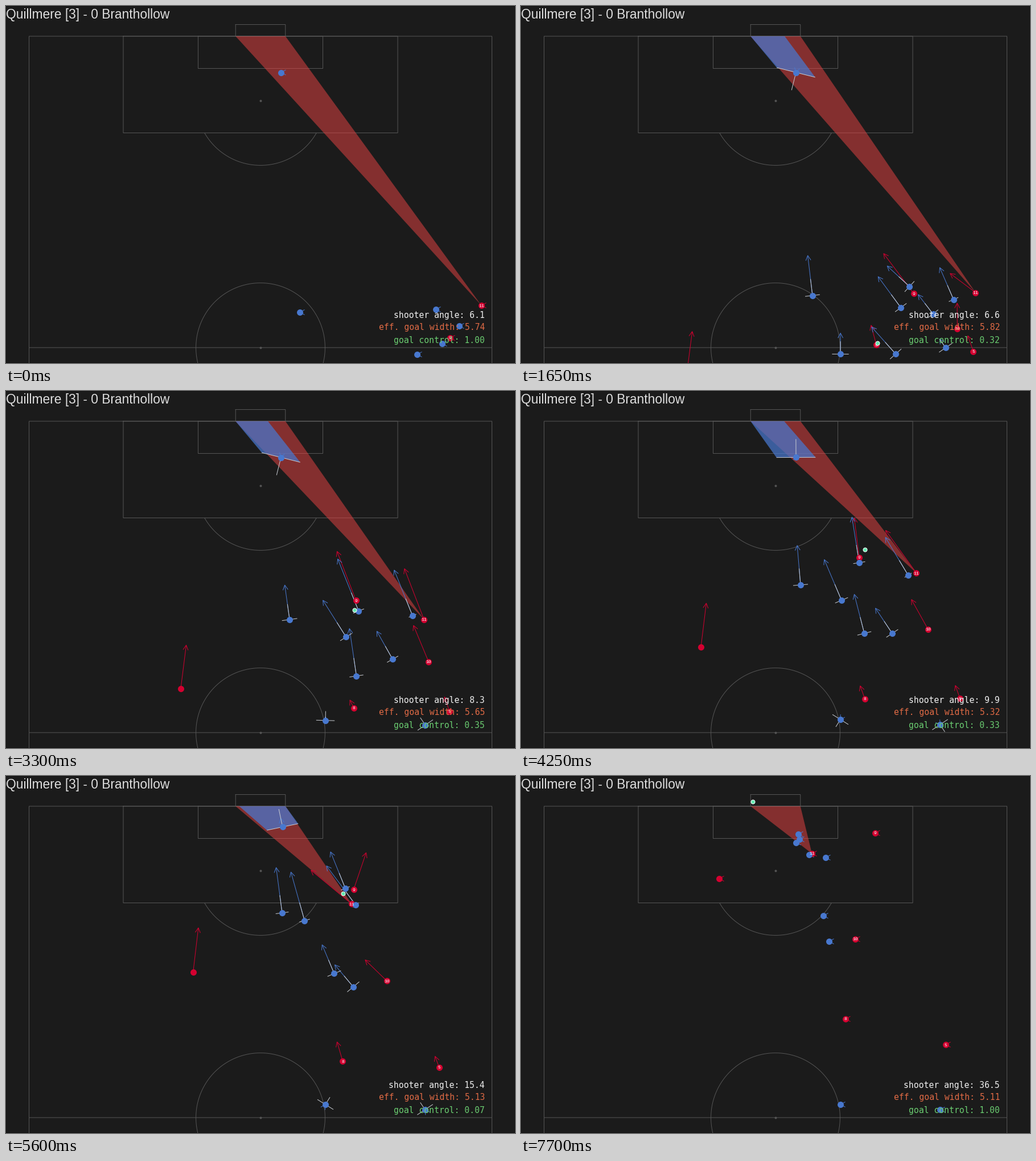
A matplotlib script that plays this animation: 894x626 px, repeating every 7750 ms.

```python
import numpy as np
import matplotlib.pyplot as plt
from matplotlib.animation import FuncAnimation
from matplotlib.collections import LineCollection

W, H, DPI = 894, 626, 64
PT = 72 / DPI                      # points per pixel
FRAMES, STEP = 155, 50

BG, LINE = "#1b1b1b", "#555555"
RED, BLUE, PALE, MINT = "#d40030", "#4878cf", "#c8ccd2", "#64ebb0"

# Pitch geometry: 68 m wide, half length 52.5 m
LEFT, RIGHT, TOP, HALF = 40.5, 853.5, 53, 599
MX, MY = (RIGHT - LEFT) / 68, (HALF - TOP) / 52.5
MID = (LEFT + RIGHT) / 2
POSTS = MID + 3.66 * MX * np.array([-1, 1])
RADIUS = 113.4

# Waypoint times, chosen by how many points a run has
CLOCKS = {3: (0, 4.25, 7.7),
          4: (0, 2.35, 4.25, 7.7),
          5: (0, 1, 4.25, 6.55, 7.7),
          7: (0, 1, 2.35, 4.25, 5.6, 6.55, 7.7)}
KICK, CONTROL, SHOT, END = 2.05, 5.6, 6.95, 7.7


def run(*points):
    """Smooth run through waypoints; gives position and velocity."""
    p, clock = np.array(points, float), np.array(CLOCKS[len(points)])
    m = np.gradient(p, clock, axis=0)

    def at(t):
        k = min(np.searchsorted(clock, t, "right") - 1, len(clock) - 2)
        h = clock[k + 1] - clock[k]
        s = (t - clock[k]) / h
        a, b, u, v = p[k], p[k + 1], m[k], m[k + 1]
        pos = (a + (3 * s**2 - 2 * s**3) * (b - a)
               + h * ((s**3 - 2 * s**2 + s) * u + (s**3 - s**2) * v))
        vel = (6 * (s - s**2) * (b - a) / h
               + (3 * s**2 - 4 * s + 1) * u + (3 * s**2 - 2 * s) * v)
        return pos, vel
    return at


def sway(t):
    """Slow rocking that turns a standing player to and fro."""
    return np.cos(np.pi * (t - .5) / 2)


def settle(rest, gap, facing):
    """Slow down from rest + gap and stay at rest."""
    rest, gap, facing = (np.array(v, float) for v in (rest, gap, facing))

    def at(t):
        k = max(0, 1 - t / 4)
        return rest + gap * k**2.5, sway(t) * facing - .625 * gap * k**1.5
    return at


def keeper(t):
    """Stand, step back towards the goal line, come out again."""
    start, span, depth = 4.2, 3.5, 30
    f = np.clip((t - start) / span, 0, 1)
    step = np.sin(np.pi * f) ** 2
    speed = -depth * np.pi / span * np.sin(2 * np.pi * f)
    return (np.array([483 + 3 * step, 116.5 - depth * step]),
            speed * np.array([.2, 1]) + 2 * sway(t) * np.array([.25, -1]))


reds = {
    "11": run((835, 525), (822.3, 519.2), (767.3, 472.2), (694.3, 319),
              (607, 224.3), (535, 175.8), (511, 136)),
    "9": run((780, 582), (724, 543), (594, 292), (625, 145), (622, 100)),
    "10": run((760, 636), (762, 532), (715, 418), (587, 286)),
    "5": run((810, 650), (771, 539), (746, 471)),
    "8": run((640, 655), (618, 573), (604, 540), (570, 426)),
    "": run((275, 770), (316, 449), (348, 180)),
}
blues = [
    keeper,
    run((516, 537), (516, 541), (506, 458), (491, 340), (485, 240), (471, 161), (487, 102)),
    run((755, 532), (709, 512), (656, 460), (594, 301), (596, 197), (553, 145), (489, 111)),
    run((796, 561), (775, 543), (680, 323), (571, 173), (535, 143)),
    run((722, 611), (691, 563), (563, 367), (508, 185), (506, 138)),
    run((766, 592), (705, 514), (652, 425), (541, 290)),
    run((735, 680), (633, 572), (603, 425), (531, 245)),
    settle((736, 585), (37, 54), (.6, .9)),
    settle((561, 576), (0, 130), (-.5, .8)),
]


def ball_at(t):
    """Carried by 8, passed ahead of 11, dribbled, then shot into the corner."""
    if t < KICK:
        return reds["8"](t)[0] + (2, -3)
    lead = np.array([-15, -18])
    if t < CONTROL:
        a, b = ball_at(KICK - 1e-6), reds["11"](CONTROL)[0] + lead
        u = (t - KICK) / (CONTROL - KICK)
        return a + (b - a) * (u, 1 - (1 - u) ** 1.7)
    if t < SHOT:
        return reds["11"](t)[0] + lead * max(0, 1 - (t - CONTROL) / .6)
    a = reds["11"](SHOT)[0]
    return a + (np.array([407, 45]) - a) * (t - SHOT) / (END - SHOT)


def heading(v):
    n = np.hypot(*v)
    return v / n if n > 1e-6 else np.array([-1.0, 0.0])


def across(u):
    return np.array([-u[1], u[0]])


def arrow(p, v):
    u, tip = heading(v), p + v
    back, wing = tip - 8.5 * u, 4.5 * across(u)
    return [[p, tip], [back + wing, tip, back - wing]]


def shoulders(p, v, dist, is_keeper):
    """Ends of the body line, left end first."""
    side = across(heading(v))
    if side[0] < 0:
        side = -side
    if is_keeper:
        half = np.interp(dist, (90, 180, 300), (22, 28, 34.8))
    else:
        half = 16.5 - .05 * np.hypot(*v) - 6 * max(0, 1 - dist / 150)
    return p - half * side, p + half * side


def to_goal_line(src, p):
    return src[0] + (p[0] - src[0]) * (TOP - src[1]) / (p[1] - src[1])


fig = plt.figure(figsize=(W / DPI, H / DPI), dpi=DPI, facecolor=BG)
ax = fig.add_axes([0, 0, 1, 1])
ax.set(xlim=(0, W), ylim=(H, 0))
ax.axis("off")


def stroke(x, y, color=LINE, lw=1.0):
    ax.plot(x, y, color=color, lw=lw * PT, zorder=1, solid_joinstyle="miter", snap=False)


def box(half_width, y0, y1):
    a, b = MID - half_width, MID + half_width
    stroke([a, a, b, b, a], [y0, y1, y1, y0, y0])


def arc(cy, a0, a1):
    a = np.linspace(a0, a1, 200)
    stroke(MID + RADIUS * np.cos(a), cy + RADIUS * np.sin(a))


stroke([0, W, W, 0, 0], [0, 0, H, H, 0], "#0c0c0c", 1.4)
stroke([LEFT, LEFT, RIGHT, RIGHT], [H + 5, TOP, TOP, H + 5])
stroke([LEFT, RIGHT], [HALF, HALF])
box(20.16 * MX, TOP, 222.5)
box(9.16 * MX, TOP, 109.5)
box(3.66 * MX, 32.5, TOP)
arc(HALF, 0, 2 * np.pi)
edge = np.arcsin(56.5 / RADIUS)
arc(166, edge, np.pi - edge)


def dots(color, diameter, z, **kw):
    return ax.scatter([], [], s=(diameter * PT) ** 2, facecolor=color, zorder=z, **kw)


def lines(color, z):
    return ax.add_collection(LineCollection([], colors=color, linewidths=PT, zorder=z))


def text(x, y, s, size, color, font, **kw):
    return ax.text(x, y, s, fontsize=size * PT, color=color, family=font, **kw)


dots(LINE, 4, 1, linewidths=0).set_offsets([(MID, 166), (MID, HALF)])
wedge, = ax.fill([0, 0, 0], [0, 0, 0], color="#ed4343", alpha=.5, lw=0, zorder=2)
shadow, = ax.fill([0, 0, 0], [0, 0, 0], color=BLUE, alpha=.72, lw=0, zorder=3)
body = lines(PALE, 6)
teams = [(list(reds.values()), lines(RED, 4), dots(RED, 11, 7, linewidths=0)),
         (blues, lines(BLUE, 5), dots(BLUE, 11, 8, linewidths=0))]
tags = [text(0, 0, s, 8, "white", "Liberation Mono", ha="center",
             va="center_baseline", zorder=9, clip_on=True) for s in reds]
ball = dots(MINT, 7, 10, edgecolor="white", linewidths=PT)

text(0, 22, "Quillmere [3] - 0 Branthollow", 22.8, "#dedede", "Liberation Sans", zorder=12)
readout = [text(841, y, "", 14.73, c, "DejaVu Sans Mono", ha="right", zorder=12)
           for y, c in ((547.5, "#f0f0f0"), (568, "#e06a45"), (590.5, "#6acc70"))]


def draw(i):
    t = i * STEP / 1000
    still = i in (0, FRAMES - 1)   # no speed is known at either end
    states = []
    for players, arrows, discs in teams:
        pos, vel = np.array([at(t) for at in players]).swapaxes(0, 1)
        vel = vel * (not still)
        discs.set_offsets(pos)
        arrows.set_segments([s for p, v in zip(pos, vel) for s in arrow(p, v)])
        states.append((pos, vel))
    for tag, p in zip(tags, states[0][0]):
        tag.set_position(p)
    ball.set_offsets([ball_at(t)])

    src = states[0][0][0]
    wedge.set_xy([(POSTS[0], TOP), (POSTS[1], TOP), src])

    control, segs = 1.0, []
    shadow.set_visible(not still)
    if not still:
        for n, (p, v) in enumerate(zip(*states[1])):
            a, b = shoulders(p, v, np.hypot(*(p - src)), n == 0)
            reach = 32 if n == 0 else 15 + .2 * np.hypot(*v)
            segs += [[a, b], [p, p + reach * heading(v)]]
            if n == 0:
                x0, x1 = np.clip([to_goal_line(src, a), to_goal_line(src, b)], *POSTS)
                shadow.set_xy([(x0, TOP), (x1, TOP), b, a])
                control = 1 - (x1 - x0) / (POSTS[1] - POSTS[0])
    body.set_segments(segs)

    dx, dy = (src[0] - POSTS) / MX, (src[1] - TOP) / MY
    far, near = np.arctan2(dx, dy)
    angle = far - near
    width = 2 * np.hypot(dx[1], dy) * np.sin(angle / 2)
    readout[0].set_text(f"shooter angle: {np.degrees(angle):.1f}")
    readout[1].set_text(f"eff. goal width: {width:.2f}")
    readout[2].set_text(f"goal control: {control:.2f}")
    return []


anim = FuncAnimation(fig, draw, frames=FRAMES, interval=STEP, repeat=True,
                     repeat_delay=0, init_func=lambda: draw(0), blit=False)
plt.show()
```
